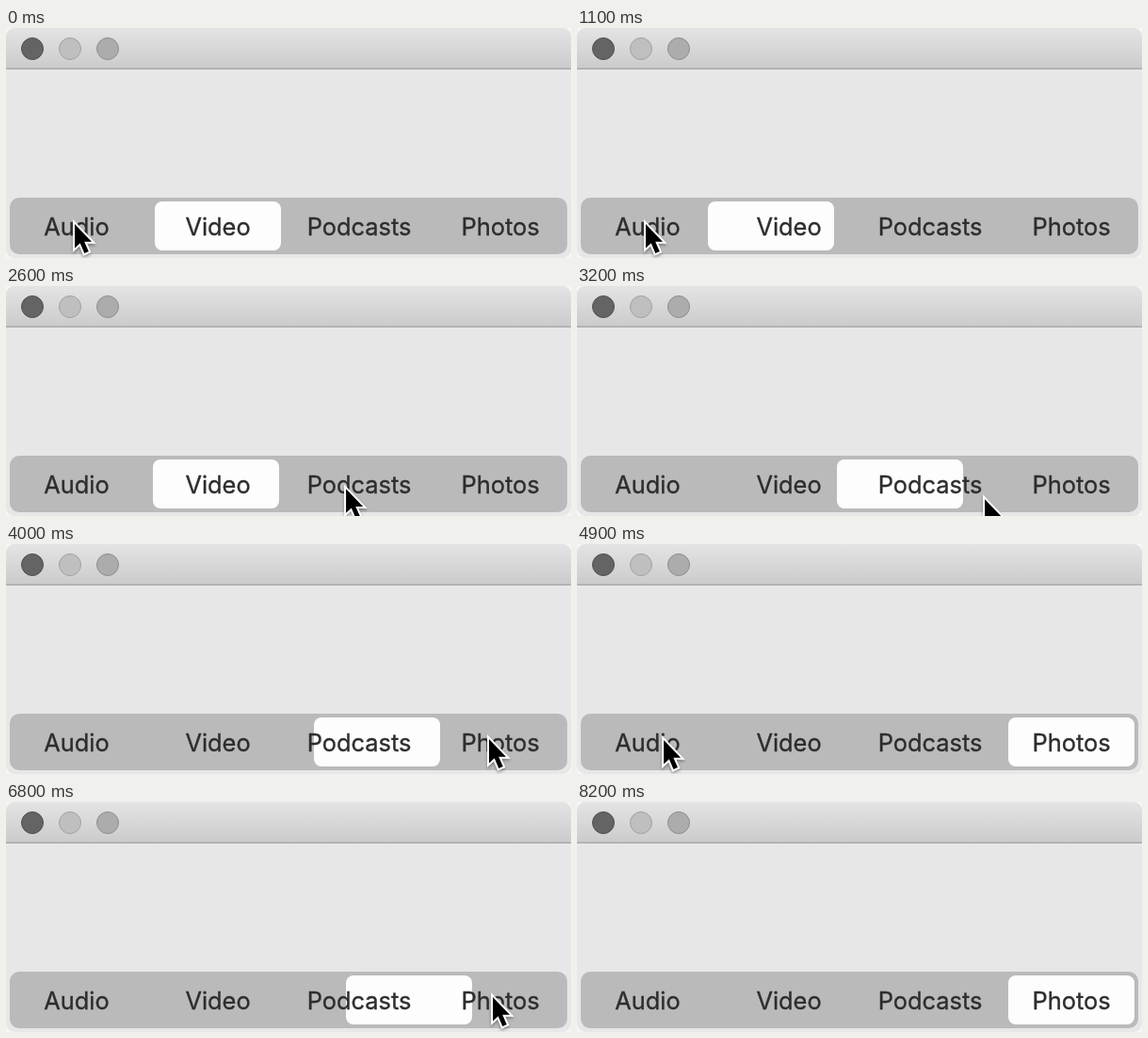
These frames come from a looping animation (600x244 px, 8400 ms). An HTML page:

```html
<!DOCTYPE html>
<html lang="en">
<meta charset="utf-8">
<title>Segmented control</title>
<style>
  html, body { margin: 0; width: 100%; height: 100%; overflow: hidden; background: #f6f6f6; }
  svg { display: block; }
  text { font: 25.4px Inter, sans-serif; fill: #2d2d2d; stroke: #2d2d2d; stroke-width: .35; text-anchor: middle; }
  #cursor { filter: drop-shadow(0 2px 1.5px #0005); }
</style>
<svg width="600" height="244" viewBox="0 0 600 244">
  <defs>
    <linearGradient id="bar" x2="0" y2="1">
      <stop stop-color="#e4e4e4"/>
      <stop offset="1" stop-color="#cbcbcb"/>
    </linearGradient>
    <clipPath id="window"><rect width="600" height="244" rx="9"/></clipPath>
  </defs>
  <g clip-path="url(#window)">
    <rect width="600" height="244" fill="#e7e7e7"/>
    <rect width="600" height="43" fill="url(#bar)"/>
    <rect y="42.5" width="600" height="1.5" fill="#a9a9a9"/>
  </g>
  <circle cx="28" cy="22" r="11.5" fill="#646464" stroke="#505050"/>
  <circle cx="68" cy="22" r="11.5" fill="#bfbfbf" stroke="#a2a2a2"/>
  <circle cx="108" cy="22" r="11.5" fill="#acacac" stroke="#8e8e8e"/>
  <rect x="4" y="180" width="592" height="60" rx="10" fill="#bababa"/>
  <rect id="pill" y="184" width="134" height="52" rx="8" fill="#fdfdfd"/>
  <text x="75" y="220">Audio</text>
  <text x="225" y="220">Video</text>
  <text x="375" y="220">Podcasts</text>
  <text x="525" y="220">Photos</text>
  <path id="cursor" d="M0 0V25.5L5.7 20.2 10.3 31 14.8 29 10.2 18.7H18Z"
    stroke="#fff" stroke-width="4" paint-order="stroke"/>
</svg>
<script>
  const LOOP = 8400, STEP = 100, HIDE_AT = 7000;
  const TRAVEL = 700, REST = 150; // pointer move, then pause before the click
  const pill = document.getElementById('pill');
  const cursor = document.getElementById('cursor');

  const visits = [
    { segment: 1, click: -1000, x: 73, y: 208 },
    { segment: 0, click: 1047, x: 73, y: 208 },
    { segment: 1, click: 2047, x: 216, y: 216 },
    { segment: 2, click: 2947, x: 362, y: 215 },
    { segment: 3, click: 3947, x: 513, y: 207 },
    { segment: 0, click: 5147, x: 92, y: 208 },
    { segment: 3, click: 6547, x: 517, y: 207 }
  ];

  const mix = (a, b, k) => a + (b - a) * k;

  // Critically damped spring with a 0.55 s response
  function spring(ms) {
    const s = ms / 1000 * 2 * Math.PI / 0.55;
    return 1 - (1 + s) * Math.exp(-s);
  }

  function pillX(t) {
    const i = visits.findLastIndex(v => v.click <= t);
    const to = visits[i], from = visits[i - 1] ?? to;
    return 8 + 150 * mix(from.segment, to.segment, spring(t - to.click));
  }

  // Quick start, slow arrival, sagging below the straight line
  function pointer(t) {
    const next = visits.findIndex(v => v.click > t);
    const i = next < 0 ? visits.length - 1 : next;
    const from = visits[i - 1], to = visits[i];
    const p = (t - to.click + REST + TRAVEL) / TRAVEL;
    const e = 1 - (1 - Math.min(1, Math.max(0, p))) ** 4;
    const sag = 0.4 * Math.abs(to.x - from.x) * e * (1 - e);
    return [mix(from.x, to.x, e), mix(from.y, to.y, e) + sag];
  }

  function draw() {
    const t = Math.floor(performance.now() % LOOP / STEP) * STEP;
    pill.setAttribute('x', Math.round(pillX(t)));
    cursor.setAttribute('transform', `translate(${pointer(t)})`);
    cursor.setAttribute('visibility', t < HIDE_AT ? 'visible' : 'hidden');
    requestAnimationFrame(draw);
  }
  draw();
</script>
</html>
```
